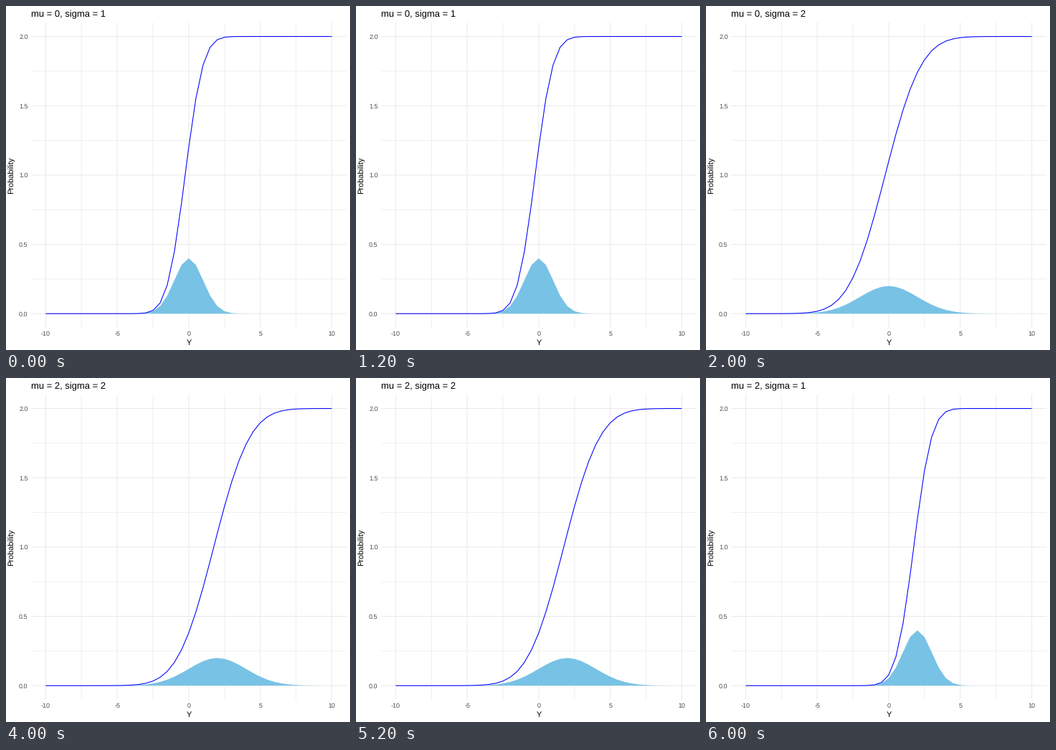
A matplotlib script for the animation above (8000 ms loop, 480 px wide and 480 px high).

```python
import matplotlib.pyplot as plt
import numpy as np
from matplotlib.animation import FuncAnimation

plt.rcParams["font.family"] = "Liberation Sans"
plt.rcParams["text.hinting"] = "none"
plt.rcParams["text.hinting_factor"] = 1

SIZE, DPI = 480, 72
LEFT, RIGHT, TOP, BOTTOM = 35.4, 474.5, 23.2, 448.6
GRID, TICK_TEXT = "#ebebeb", "#4d4d4d"
SETTINGS = [(0, 1), (0, 2), (2, 2), (2, 1)]

fig = plt.figure(figsize=(SIZE / DPI, SIZE / DPI), dpi=DPI, facecolor="white")
ax = fig.add_axes([LEFT / SIZE, 1 - BOTTOM / SIZE,
                   (RIGHT - LEFT) / SIZE, (BOTTOM - TOP) / SIZE])
ax.set(xlim=(-11, 11), ylim=(-0.1, 2.1))
ax.axis("off")


def px_x(value):
    return LEFT + (value + 11) / 22 * (RIGHT - LEFT)


def px_y(value):
    return BOTTOM - (value + 0.1) / 2.2 * (BOTTOM - TOP)


def label(x, y, text, size, color="black", ha="center", **kwargs):
    """Place text by its baseline, in pixels from the top left."""
    return fig.text(x / SIZE, 1 - y / SIZE, text, fontsize=size, color=color,
                    ha=ha, va="baseline", **kwargs)


def grid(xs, ys, width):
    for x in xs:
        ax.axvline(x, color=GRID, lw=width, zorder=0, snap=False)
    for y in ys:
        ax.axhline(y, color=GRID, lw=width, zorder=0, snap=False)


x_ticks = np.arange(-10, 11, 5)
y_ticks = np.arange(0, 2.1, 0.5)
grid(x_ticks[:-1] + 2.5, y_ticks[:-1] + 0.25, 0.75)
grid(x_ticks, y_ticks, 1.07)

for x in x_ticks:
    label(px_x(x), 460, f"{x}", 8.8, TICK_TEXT)
for y in y_ticks:
    label(30.6, px_y(y) + 3.2, f"{y:.1f}", 8.8, TICK_TEXT, ha="right")
label(px_x(0), 473, "Y", 11)
label(13.4, px_y(1), "Probability", 11, rotation=90).set(ha="right", va="center")
title = label(LEFT, 15, "", 13.2, ha="left")

ys = np.arange(-10, 10.5, 0.5)
area, = ax.fill(ys, 0 * ys, color="#78c2e5", lw=0, zorder=2)
curve, = ax.plot(ys, 0 * ys, color="blue", lw=1.07, zorder=3, snap=False,
                 solid_capstyle="butt", solid_joinstyle="round")


def update(frame):
    mu, sigma = SETTINGS[frame]
    density = np.exp(-((ys - mu) / sigma) ** 2 / 2) / (sigma * np.sqrt(2 * np.pi))
    outline = np.column_stack([ys, density])
    area.set_xy(np.vstack([outline, [ys[-1], 0], [ys[0], 0]]))
    curve.set_ydata(np.cumsum(density))
    title.set_text(f"mu = {mu}, sigma = {sigma}")
    return area, curve, title


anim = FuncAnimation(fig, update, frames=len(SETTINGS), interval=2000,
                     repeat=True, repeat_delay=0)
plt.show()
```
